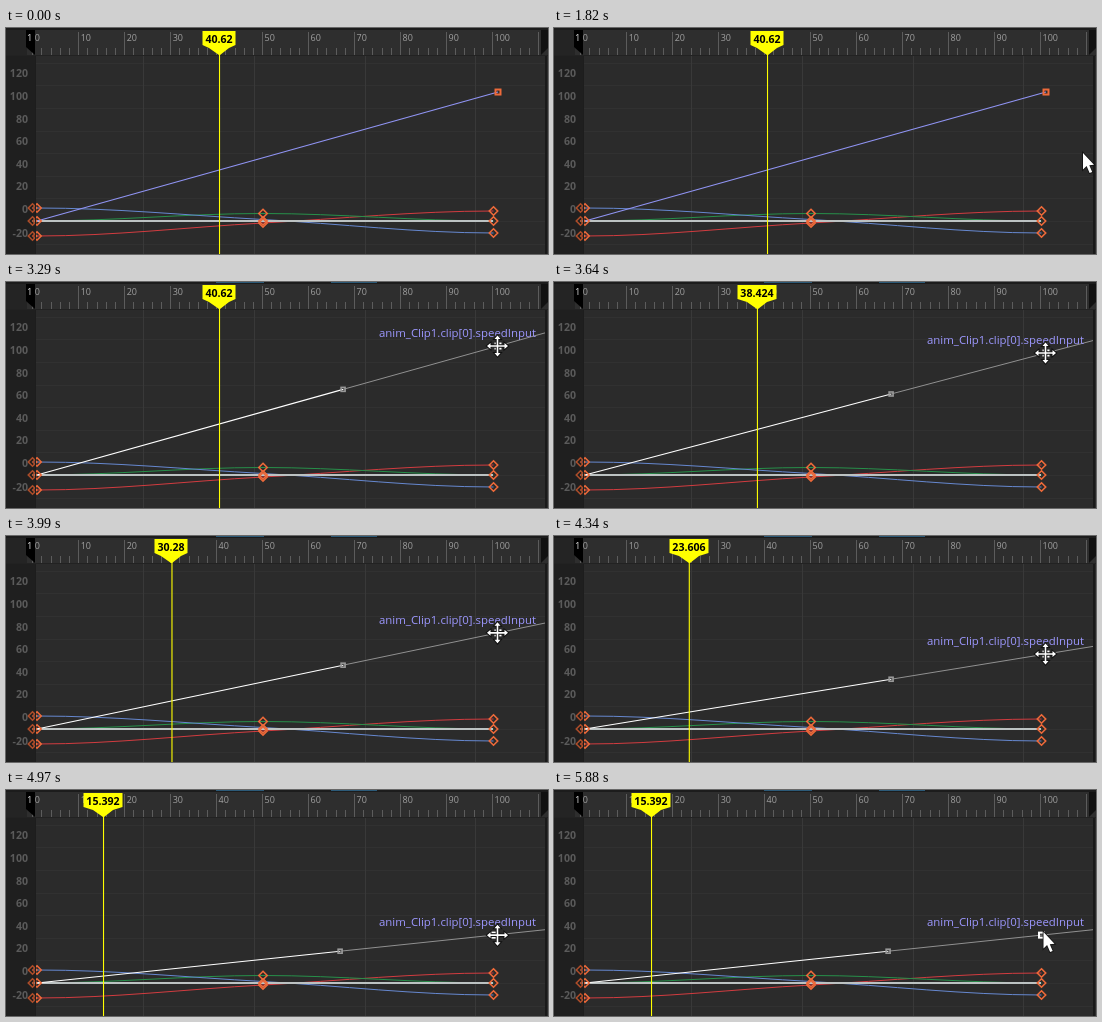
An HTML page with a canvas that plays this animation: 542x226 px, repeating every 8610 ms.

```html
<!DOCTYPE html>
<html lang="en">
<head>
<meta charset="utf-8">
<title>Graph editor drag</title>
<style>
html, body { margin: 0; width: 100%; height: 100%; overflow: hidden; background: #2b2b2b; }
canvas { display: block; }
</style>
</head>
<body>
<canvas id="stage" width="542" height="226"></canvas>
<script>
const ctx = document.getElementById('stage').getContext('2d');
const LOOP = 8610, STEP = 70, ZERO = 193;
const ORANGE = '#ee6a3a', YELLOW = '#ffff00';
const SELECT = 2450, GRAB = 3290, DROP = 4970, HIDE = 5390, SHOW = 5880;

const timeX = t => 26.2 + t * 4.598;
const valueY = v => ZERO - v * 3.175;

// Playhead value while the key is dragged: [ms, value]
const drag = [[3430, 40.62], [3640, 38.424], [3990, 30.28], [4340, 23.606], [4690, 18.688], [4970, 15.392]];
// Arrow tip while it approaches the key: [ms, x, y]
const approach = [[1820, 529, 125], [1960, 511, 92], [2170, 493, 61.5]];

function sample(points, t, column = 1) {
  if (t <= points[0][0]) return points[0][column];
  for (let i = 1; i < points.length; i++) {
    const a = points[i - 1], b = points[i];
    if (t <= b[0]) return a[column] + (b[column] - a[column]) * (t - a[0]) / (b[0] - a[0]);
  }
  return points[points.length - 1][column];
}

function rect(color, x, y, w, h) {
  ctx.fillStyle = color;
  ctx.fillRect(x, y, w, h);
}

function line(color, width, ...points) {
  ctx.strokeStyle = color;
  ctx.lineWidth = width;
  ctx.beginPath();
  for (const [x, y] of points) ctx.lineTo(x, y);
  ctx.stroke();
}

function polygon(points, fill, stroke, width = 1) {
  ctx.beginPath();
  for (const [x, y] of points) ctx.lineTo(x, y);
  ctx.closePath();
  if (stroke) {
    ctx.strokeStyle = stroke;
    ctx.lineWidth = width;
    ctx.stroke();
  }
  if (fill) {
    ctx.fillStyle = fill;
    ctx.fill();
  }
}

function text(str, x, y, color, font, align = 'left') {
  ctx.font = font + ' "Open Sans", sans-serif';
  ctx.textAlign = align;
  ctx.fillStyle = color;
  ctx.fillText(str, x, y);
}

function square(x, y, size, color, width) {
  ctx.strokeStyle = color;
  ctx.lineWidth = width;
  ctx.strokeRect(x - size / 2, y - size / 2, size, size);
}

function diamond(x, y) {
  polygon([[x, y - 4.2], [x + 4.2, y], [x, y + 4.2], [x - 4.2, y]], null, ORANGE, 1.6);
}

// Smooth curve through three keys, with flat ends
function curve(color, start, middle, end) {
  const x0 = 31, x1 = 257, x2 = 487.5, slope = (end - start) / (x2 - x0) * 77;
  ctx.strokeStyle = color;
  ctx.lineWidth = 1;
  ctx.beginPath();
  ctx.moveTo(26, start);
  ctx.lineTo(x0, start);
  ctx.bezierCurveTo(x0 + 77, start, x1 - 77, middle - slope, x1, middle);
  ctx.bezierCurveTo(x1 + 77, middle + slope, x2 - 77, end, x2, end);
  ctx.stroke();
}

function drawGrid() {
  rect('#2b2b2b', 0, 0, 542, 226);
  for (let v = -1; v < 8; v++) rect('#313131', 30, Math.round(ZERO - v * 22.6), 509, 1);
  for (let x = 137; x < 535; x += 110.8) rect('#393939', Math.round(x), 28, 1, 198);
}

function drawAxis() {
  rect('rgba(0,0,0,.28)', 0, 28, 30, 198);
  rect('#1d1d1d', 29, 28, 1, 198);
  rect('#191919', 539, 0, 2, 226);
  for (let v = -20; v <= 120; v += 20) {
    text(v, 22, 185 - v * 1.13 + (v < 0 ? 1 : 0), '#5a5a5a', 'bold 10.6px', 'right');
  }
}

function drawRuler(selected) {
  rect('#2e2e2e', 0, 0, 542, 28);
  rect('#242424', 0, 0, 21, 28);
  rect('#1c1c1c', 0, 0, 542, 2);
  if (selected) {
    rect('#2c5a78', 210, 0, 48, 1);
    rect('#2c5a78', 325, 0, 46, 1);
  }
  for (let t = 0; t <= 110; t += 2) {
    const major = t % 10 === 0;
    rect('#5c5c5c', Math.round(timeX(t)), major ? 4 : 20, 1, major ? 23 : 7);
  }
  for (let t = 0; t <= 100; t += 10) text(t, timeX(t) + 2.5, 13, '#a0a0a0', '9px');
  rect('#222', 0, 27, 542, 1);
  polygon([[20, 2], [29, 2], [29, 27], [20, 19]], '#000');
  text('1', 21, 13, '#ddd', '9.5px');
  polygon([[535, 2], [542, 2], [542, 20], [535, 27]], '#111');
}

function drawSpeed(selected, keyX, keyY) {
  const slope = (keyY - ZERO) / (keyX - 31);
  const at = x => [x, ZERO + slope * (x - 31)];
  if (!selected) {
    line('#9094f4', 1.1, at(31), at(keyX));
    square(keyX, keyY, 5, ORANGE, 2);
    return;
  }
  const handle = at(31 + (keyX - 31) * 0.664);
  line('#909090', 1, handle, at(539));
  line('#fff', 1.1, at(31), handle);
  square(...handle, 4, '#999', 1.6);
  square(keyX, keyY, 5, '#fff', 2);
  text('anim_Clip1.clip[0].speedInput', 373, keyY - 9, '#9d98ff', '11.4px');
}

function drawPlayhead(value) {
  const x = Math.round(timeX(value)), label = String(+value.toFixed(3));
  const half = label.length > 5 ? 19.5 : 16.5;
  rect(YELLOW, timeX(value), 26, 1.1, 200);
  polygon([[x - half, 3], [x + half, 3], [x + half, 17], [x + 10, 20],
    [x + 1, 27], [x, 27], [x - 10, 20], [x - half, 17]], YELLOW);
  text(label, x, 15, '#000', 'bold 10.6px', 'center');
}

function drawArrow(x, y) {
  const shape = [[0, 0], [0, 16.5], [3.6, 13], [6.6, 20], [9.2, 19], [6.3, 12.2], [11, 11.8]];
  polygon(shape.map(([dx, dy]) => [x + dx, y + dy]), '#fff', '#111', 1.6);
}

function drawMove(x, y) {
  const arm = [[-0.8, -0.8], [-0.8, -7], [-3, -7], [0, -10.5], [3, -7], [0.8, -7]];
  const shape = [];
  for (let i = 0; i < 4; i++) {
    const c = Math.round(Math.cos(i * Math.PI / 2)), s = Math.round(Math.sin(i * Math.PI / 2));
    for (const [dx, dy] of arm) shape.push([x + dx * c - dy * s, y + dx * s + dy * c]);
  }
  polygon(shape, '#fff', '#111', 2);
}

function draw(now) {
  const t = Math.floor((now % LOOP) / STEP) * STEP;
  const selected = t >= SELECT;
  const value = sample(drag, t);
  const keyX = t >= DROP ? 487.5 : 492;
  const keyY = valueY(value) + (t >= DROP ? 1 : 0);

  drawGrid();
  curve('#d23c40', 208, 195, 183);
  curve('#27904a', 193, 185.5, 193);
  curve('#6688d0', 180, 191.5, 205);
  line('#bcc2c2', 2, [26, ZERO], [487, ZERO]);
  drawSpeed(selected, keyX, keyY);
  for (const y of [180, 193, 208]) diamond(26.5, y);
  for (const y of [180, 193, 208]) diamond(31, y);
  for (const y of [185.5, 193, 195]) diamond(257, y);
  for (const y of [183, 193, 205]) diamond(487.5, y);
  drawAxis();
  drawRuler(selected);
  drawPlayhead(value);

  if (t >= SHOW) drawArrow(489.5, 142);
  else if (t >= GRAB && t < HIDE) drawMove(491.5, keyY);
  else if (t >= 1820 && t < GRAB) drawArrow(sample(approach, t), sample(approach, t, 2));
}

const start = performance.now();
function tick() {
  draw(performance.now() - start);
  requestAnimationFrame(tick);
}
tick();
</script>
</body>
</html>
```
